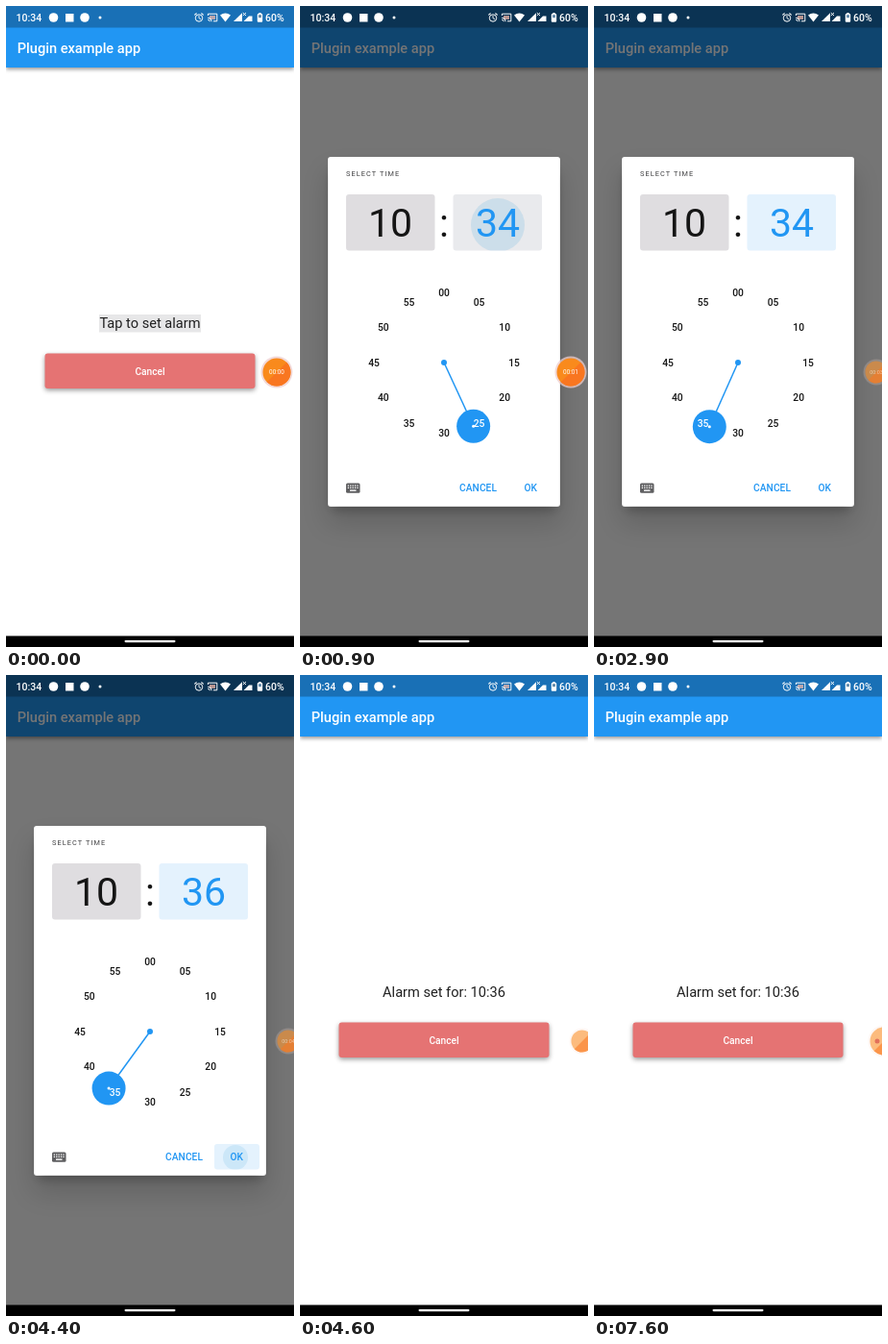
Write an HTML page with a canvas that moves like this. It is 300 by 667 pixels and loops after 8 s.

```html
<!DOCTYPE html>
<html lang="en">
<head>
<meta charset="utf-8">
<title>Alarm time picker</title>
<style>
  html, body { margin: 0; width: 100%; height: 100%; overflow: hidden; background: #fff; }
  canvas { display: block; width: 300px; height: 667px; }
</style>
</head>
<body>
<canvas id="stage"></canvas>
<script>
const W = 300, H = 667, LOOP = 8000, STEP = 100;
const BLUE = '#2196f3', INK = '#151515', TINT = '#e4f2fd', GREY = '#dfdde0';
const DIAL = { x: 150, y: 371, r: 73, knob: 17.5 };
const dpr = window.devicePixelRatio || 1;

function prepare(canvas) {
  canvas.width = W * dpr;
  canvas.height = H * dpr;
  const context = canvas.getContext('2d');
  context.scale(dpr, dpr);
  return context;
}

const screen = prepare(document.getElementById('stage'));
const sheetCanvas = document.createElement('canvas');
const sheet = prepare(sheetCanvas);
let g = screen;

const clamp = v => Math.max(0, Math.min(1, v));
const span = (t, from, to) => clamp((t - from) / (to - from));
const mix = (a, b, p) => a + (b - a) * p;

// Material standard curve, cubic-bezier(.4, 0, .2, 1)
function standard(x) {
  let lo = 0, hi = 1;
  for (let i = 0; i < 20; i++) {
    const u = (lo + hi) / 2, v = 1 - u;
    if (1.2 * u * v * v + 0.6 * u * u * v + u ** 3 < x) lo = u; else hi = u;
  }
  return 3 * lo * lo * (1 - lo) + lo ** 3;
}

function rect(x, y, w, h, color, radius = 0) {
  g.fillStyle = color;
  g.beginPath();
  g.roundRect(x, y, w, h, radius);
  g.fill();
}

function disc(x, y, r, color) {
  g.fillStyle = color;
  g.beginPath();
  g.arc(x, y, Math.max(0, r), 0, Math.PI * 2);
  g.fill();
}

function poly(points, color) {
  g.fillStyle = color;
  g.beginPath();
  points.forEach(([x, y]) => g.lineTo(x, y));
  g.fill();
}

function line(points, color, width) {
  g.strokeStyle = color;
  g.lineWidth = width;
  g.beginPath();
  points.forEach(([x, y]) => g.lineTo(x, y));
  g.stroke();
}

function text(str, x, y, size, color, { weight = 400, align = 'left', spacing = 0 } = {}) {
  g.font = `${weight} ${size}px Roboto, sans-serif`;
  g.letterSpacing = spacing + 'px';
  g.textAlign = align;
  g.fillStyle = color;
  g.fillText(str, x, y);
}

function shadowed(color, blur, dy, draw) {
  g.save();
  g.shadowColor = color;
  g.shadowBlur = blur * dpr;
  g.shadowOffsetY = dy * dpr;
  draw();
  g.restore();
}

function drawApp(t) {
  rect(0, 0, W, H, '#fff');
  shadowed('rgba(0,0,0,.4)', 4, 1.5, () => rect(0, 0, W, 64, BLUE));
  rect(0, 0, W, 22.5, '#1970b6');
  text('Plugin example app', 11.7, 49, 14.6, '#fff', { weight: 500 });

  const isSet = t >= 4500;
  if (t < 300) rect(97, 321, 106, 18.5, '#e7e7e8');
  text(isSet ? 'Alarm set for: 10:36' : 'Tap to set alarm', 150, 335.3, 14.6, '#202020', { align: 'center' });

  shadowed('rgba(0,0,0,.4)', 5, 2, () => rect(40.5, 361.5, 219, 36.5, '#e57373', 3));
  text('Cancel', 150, 383.5, 10.2, '#fff', { weight: 500, align: 'center' });
}

function drawStatus() {
  const white = '#fff';
  text('10:34', 10.5, 16, 10.5, white, { weight: 500 });
  disc(49.5, 12, 4.8, white);
  rect(62, 8, 8.5, 8.5, white);
  disc(82, 12, 4.8, white);
  disc(98, 12, 1.5, white);

  // alarm clock
  g.strokeStyle = white;
  g.lineWidth = 1;
  g.beginPath();
  g.arc(201, 12.5, 3.7, 0, Math.PI * 2);
  g.stroke();
  line([[201, 10], [201, 12.7], [203, 13.7]], white, 0.9);
  line([[196.3, 9.4], [198.6, 7.5]], white, 1.1);
  line([[203.4, 7.5], [205.7, 9.4]], white, 1.1);

  // cast
  line([[210.4, 10], [210.4, 8.2], [219.8, 8.2], [219.8, 15.8], [216, 15.8]], white, 1);
  rect(212, 10, 6, 4, 'rgba(255,190,170,.7)');
  g.strokeStyle = white;
  for (const r of [2, 4]) {
    g.beginPath();
    g.arc(210.2, 16.2, r, -Math.PI / 2, 0);
    g.stroke();
  }

  // wifi
  g.fillStyle = white;
  g.beginPath();
  g.moveTo(228.5, 16.5);
  g.lineTo(223, 9.6);
  g.quadraticCurveTo(228.5, 5.4, 234, 9.6);
  g.fill();

  poly([[237, 16], [246, 16], [246, 7.2]], white);
  poly([[247.5, 16], [256.5, 16], [256.5, 10.5], [253, 10.5]], white);
  line([[246.8, 7], [250, 10]], white, 1);
  line([[250, 7], [246.8, 10]], white, 1);
  rect(261.8, 8, 5.4, 8.8, white, 1);
  rect(263.3, 7, 2.4, 1.5, white);
  rect(263, 9.2, 3, 3, 'rgba(20,80,130,.65)');
  text('60%', 270, 16, 10.5, white, { weight: 500 });
}

function drawNavigation() {
  rect(0, 655.5, W, 11.5, '#000');
  rect(123.5, 660, 53, 2.2, '#fff', 1.1);
}

function ripple(x, y, w, h, cx, cy, r, alpha) {
  if (alpha <= 0) return;
  g.save();
  g.beginPath();
  g.roundRect(x, y, w, h, 3);
  g.clip();
  disc(cx, cy, r, `rgba(33,150,210,${alpha})`);
  g.restore();
}

function drawLabels(minutes, color) {
  for (let i = 0; i < 12; i++) {
    const a = i * Math.PI / 6;
    const label = String(i * (minutes ? 5 : 2)).padStart(2, '0');
    text(label, DIAL.x + DIAL.r * Math.sin(a), DIAL.y - DIAL.r * Math.cos(a) + 3.8, 10.3, color,
      { weight: 500, align: 'center' });
  }
}

function drawDial(degrees, minutes) {
  const a = degrees * Math.PI / 180;
  const x = DIAL.x + DIAL.r * Math.sin(a), y = DIAL.y - DIAL.r * Math.cos(a);
  drawLabels(minutes, INK);
  line([[DIAL.x, DIAL.y], [x, y]], BLUE, 1.5);
  disc(DIAL.x, DIAL.y, 3, BLUE);
  disc(x, y, DIAL.knob, BLUE);
  g.save();
  g.beginPath();
  g.arc(x, y, DIAL.knob, 0, Math.PI * 2);
  g.clip();
  drawLabels(minutes, '#fff');
  g.restore();
  if (Math.abs(degrees % 30) > 0.5) disc(x, y, 1.5, '#fff');
}

function drawKeyboardIcon() {
  rect(48, 496.5, 14.5, 10.3, '#5f5f61', 1.5);
  for (let row = 0; row < 2; row++)
    for (let col = 0; col < 5; col++)
      rect(49.7 + col * 2.4, 498.4 + row * 2.3, 1.3, 1.3, '#fff');
  rect(52, 503.4, 6.5, 1.4, '#fff');
}

function handAngle(t) {
  if (t < 2900) return mix(150, 204, standard(span(t, 865, 1065)));
  return 204 + 11.2 * span(t, 2900, 3200) + 0.8 * span(t, 3400, 3800);
}

function drawDialog(t) {
  const minutes = t >= 865;
  const angle = handAngle(t);
  const minute = t < 2900 ? 34 : Math.round(angle / 6);

  shadowed('rgba(0,0,0,.16)', 28, 17, () => rect(29, 157, 242, 364, '#fff', 3));
  shadowed('rgba(0,0,0,.25)', 11, 8, () => rect(33, 164, 234, 352, '#fff', 3));
  rect(30, 158, 240, 362.5, '#fff', 3);
  text('SELECT TIME', 48, 176.8, 7.3, '#3c3c3e', { spacing: 1.1 });

  rect(48, 196, 92.5, 58.5, minutes ? GREY : TINT, 3);
  rect(159.5, 196, 92.5, 58.5, minutes ? (t < 1000 ? '#e9eaed' : TINT) : GREY, 3);
  if (t >= 700 && t < 1500)
    ripple(159.5, 196, 92.5, 58.5, 206, 228, mix(10, 28, span(t, 700, 900)) + 30 * span(t, 900, 1300),
      0.14 * (1 - span(t, 900, 1400)));
  const center = { align: 'center' };
  text('10', 94, 239.5, 41, minutes ? INK : BLUE, center);
  text(':', 150, 239.5, 41, INK, center);
  text(minute, 206, 239.5, 41, minutes ? BLUE : INK, center);

  drawDial(angle, minutes);
  drawKeyboardIcon();

  if (t >= 4300) {
    rect(217, 488, 47, 26.5, TINT, 3);
    ripple(217, 488, 47, 26.5, 239, 502, mix(7, 13, span(t, 4300, 4400)), 0.12);
  }
  text('CANCEL', 166, 505.2, 10.2, BLUE, { weight: 500, spacing: 0.07 });
  text('OK', 233.5, 505.2, 10.2, BLUE, { weight: 500, spacing: 0.07 });
}

function drawBubble(t) {
  const dock = span(t, 1500, 1800), rest = span(t, 5000, 5600);
  const x = mix(282, 294, dock) + 8 * rest;
  const r = mix(14.5, 11.5, dock) + 3 * rest;
  g.save();
  g.globalAlpha = mix(1, 0.55, dock);
  disc(x, 381, r + 2, dock < 1 ? 'rgba(238,205,205,.75)' : 'rgba(250,220,205,.4)');
  disc(x, 381, r, '#f98a1c');
  g.beginPath();
  g.arc(x, 381, r, -Math.PI / 4, Math.PI * 0.75);
  g.fillStyle = '#f97620';
  g.fill();
  if (t < 4500) {
    const seconds = Math.floor((t + 300) / 1000);
    text('00:0' + seconds, x, 383.3, mix(6.4, 5.4, dock), '#fff', { align: 'center' });
  }
  g.restore();
  if (rest > 0) disc(295, 381, 2.5 * rest, '#e2705a');
}

function render(t) {
  g = screen;
  drawApp(t);

  const opacity = t < 4500 ? span(t, 25, 225) : 0.4 * (1 - span(t, 4500, 4600));
  if (opacity > 0 && t >= 100) {
    rect(0, 0, W, H, `rgba(0,0,0,${0.54 * Math.sqrt(opacity)})`);
    g = sheet;
    g.clearRect(0, 0, W, H);
    drawDialog(t);
    g = screen;
    g.globalAlpha = opacity;
    g.drawImage(sheetCanvas, 0, 0, W, H);
    g.globalAlpha = 1;
  }

  drawStatus();
  drawNavigation();
  drawBubble(t);
}

const start = performance.now();
function tick() {
  const t = (performance.now() - start) % LOOP;
  render(Math.floor(t / STEP) * STEP);
  requestAnimationFrame(tick);
}
tick();
</script>
</body>
</html>
```
